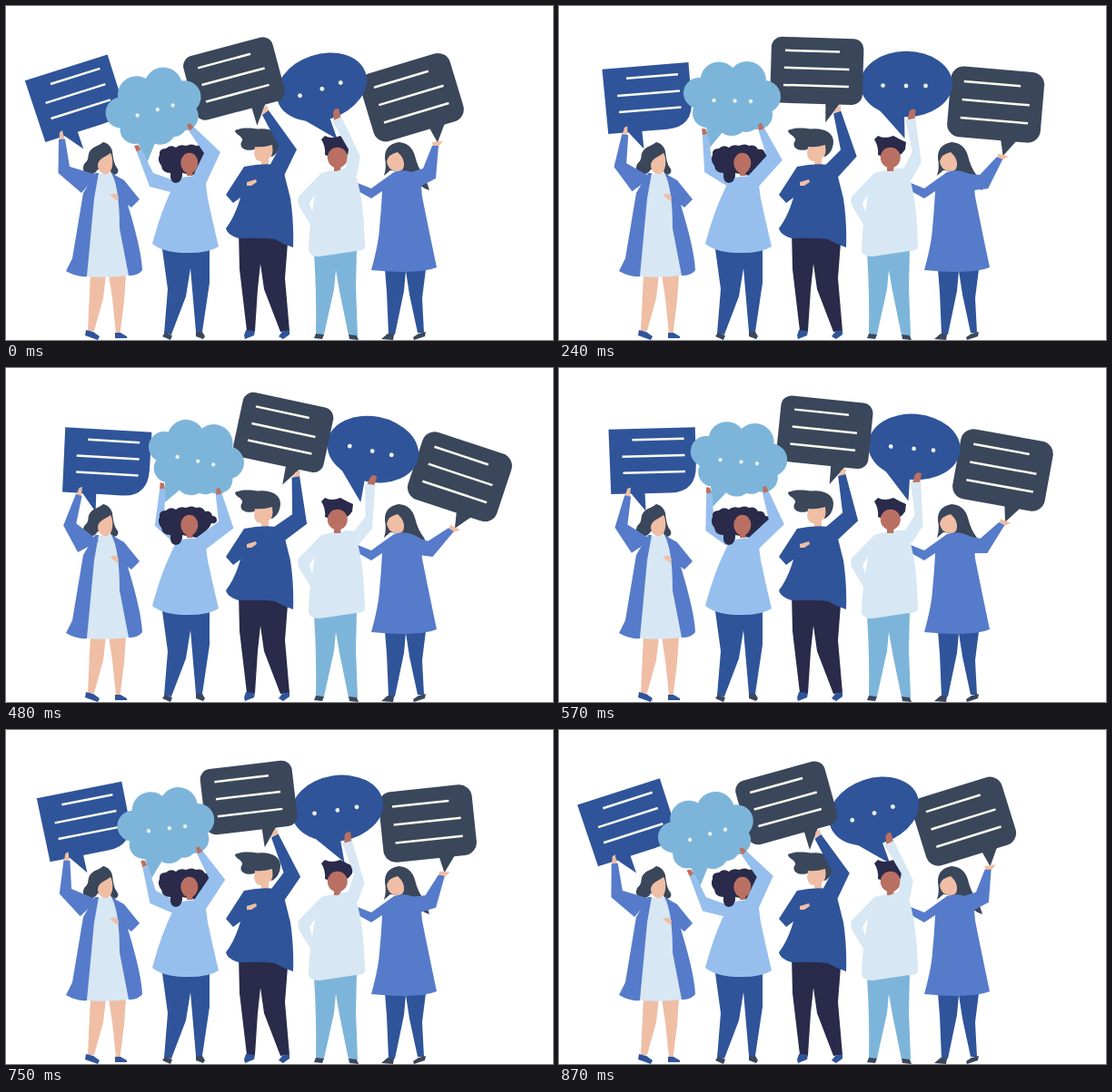
An HTML page that plays this animation: 602 px wide and 368 px high, repeating every 0.9 s.

```html
<!DOCTYPE html>
<html lang="en">
<head>
<meta charset="utf-8">
<title>People with speech bubbles</title>
<style>
html, body { margin: 0; width: 100%; height: 100%; overflow: hidden; background: #fff; }
svg { display: block; width: 602px; height: 368px; }
.blue { fill: #2f549a; }
.mid { fill: #567bca; }
.light { fill: #96bfee; }
.sky { fill: #7db5da; }
.slate { fill: #3a465a; }
.pale { fill: #d7e7f4; }
.navy { fill: #2a2a4b; }
.skin { fill: #efbea5; }
.brown { fill: #b97062; }
.dots { fill: #e9f1e8; }
.lines { fill: none; stroke: #fbfcec; stroke-width: 2.5; }
</style>
</head>
<body>
<svg viewBox="0 0 602 368">
  <!-- bubbles -->
  <g data-arm="e" data-rest="6.2">
    <rect class="slate" x="421.8" y="66.7" width="103" height="78" rx="14"/>
    <path class="slate" d="M482 143L486 161.5L500 143Z"/>
    <path class="lines" d="M436.4 83.2H499M436 103.3H510.4M435.8 123.4H510.4"/>
  </g>
  <g data-arm="d" data-rest="8">
    <ellipse class="blue" cx="382.2" cy="86" rx="50.8" ry="36.2"/>
    <path class="blue" d="M352 114L380.5 146L380 118Z"/>
    <g class="dots"><circle cx="356.5" cy="87.6" r="2.4"/><circle cx="382" cy="88" r="2.4"/><circle cx="403.5" cy="88" r="2.4"/></g>
  </g>
  <g data-arm="c" data-rest="7.2">
    <rect class="slate" x="229.7" y="35.4" width="101.6" height="72.8" rx="11.5"/>
    <path class="slate" d="M291 107L291.6 128.3L307 107Z"/>
    <path class="lines" d="M245 50.2H305M244.4 69.3H316M244 88.4H316"/>
  </g>
  <g data-arm="a" data-rest="10.9">
    <path class="blue" d="M57.700 66.800H153V108Q153 138.300 124 138.300H96L96.500 158L81 138.300H58.700Z"/>
    <path class="lines" d="M83.4 79H140.5M72 97.3H141M72.5 115.4H141"/>
  </g>
  <g data-arm="b" data-rest="8">
    <g class="sky">
      <circle cx="154" cy="96" r="17"/><circle cx="176" cy="82" r="20.5"/>
      <circle cx="207" cy="82" r="21"/><circle cx="226" cy="100" r="18"/>
      <circle cx="219" cy="120" r="16"/><circle cx="190" cy="125" r="18"/>
      <circle cx="163" cy="118" r="16"/><circle cx="206" cy="124" r="15"/>
      <ellipse cx="190" cy="103" rx="32" ry="27"/>
      <path d="M160 122L166 156L180 139L195 120Z"/>
    </g>
    <g class="dots"><circle cx="170.5" cy="104" r="2.2"/><circle cx="193.5" cy="104.5" r="2.2"/><circle cx="211" cy="105" r="2.2"/></g>
  </g>

  <!-- woman in blue dress -->
  <path class="blue" d="M417 290H462L458 322L460 360H453L444 318L440 292L438 314L428 362H421L419 315Z"/>
  <path class="slate" d="M420 361L427 362L426 368L413 367ZM454 361L462 359L461 364L449 368L448 365Z"/>
  <path class="slate" d="M417 168Q416 153 432 150Q446 151 450 165Q453 178 460 187Q463 193 466 203Q455 200 450 190L438 183L423 181L416 187Q419 178 417 168Z"/>
  <path class="skin" d="M419 171Q421 163 431 161Q439 168 438 176Q437 183 430 182Q420 181 419 171Z"/>
  <path class="mid" d="M427 183Q442 178 456 188L458 210Q466 250 474 288Q455 296 402 291Q410 262 411 245Q413 225 414 204L402 212L384 202L382 193L402 201Z"/>
  <g data-arm="e">
    <path class="skin" d="M470 155L469 150L481 148.5L476 155Z"/>
    <path class="mid" d="M469 154L476 154L473 190L448 203L436 186L459 179Z"/>
  </g>

  <!-- man in pale sweater -->
  <path class="sky" d="M339 272L386 268L385 310L387 363H377L367 314L363 291L361 312L350 362H341Q342 320 339 272Z"/>
  <path class="slate" d="M341 361L350 362L348 367L339 366ZM377 362L386 363L388 368L378 367Z"/>
  <path class="pale" fill-rule="evenodd" d="M347 184L322 210Q320 216 323 221L335 241Q333 258 333 270Q335 276 345 276L385 270Q394 270 395 266Q394 216 386 190L378 180Q360 180 347 184ZM340 208L334 217L337 227Z"/>
  <path class="navy" d="M347 147L351 143Q358 147 368 143Q375 147 382 150L381 158Q378 163 374 165L356 166L351 164Q352 155 347 147Z"/>
  <ellipse class="brown" cx="364.8" cy="167" rx="11" ry="11.3"/>
  <path class="brown" d="M361 175H369L368 182H361Z"/>
  <g data-arm="d">
    <path class="brown" d="M360 117L362 113.5L366 113L368.5 123L361 126Z"/>
    <path class="pale" d="M359 127L369 122L390 166L386 187L370 200L364 182L374 178L377 158Z"/>
  </g>

  <!-- man in blue sweater -->
  <path class="navy" d="M256 248H311L307 300L312 358L302 359L284 312L280 284L277 312L274 358H265L257 290Z"/>
  <path class="blue" d="M264 357L274 358L273 363L263 367L262 363ZM304 359L312 357V362L305 367L300 364Z"/>
  <path class="slate" d="M252 137C262 133 270 135 278 135.500C290 134 302 139 302 149C302 159 296 165 292 166L290 156L277 156C270 161 259 159 258.500 153C258 149 262 149 259 145C257 142 252 141 252 137Z"/>
  <path class="skin" d="M274 155Q283 156 293 153Q295 166 289 168V176H281V171Q275 172 273 163Z"/>
  <path class="blue" d="M262 177Q285 172 304 176L307 188L313 212Q317 238 316 266Q306 263 296 257Q285 255 256 256Q243 252 242 245Q252 232 258 211L250 217L242 208Z"/>
  <path class="skin" d="M265 194L275 191L276 194L270 198L265 198Z"/>
  <g data-arm="c">
    <path class="skin" d="M282 120L283 113L287 109L289 115Z"/>
    <path class="blue" d="M282 120L289 115L320 158L304 191L285 190L289 178L301 156Z"/>
  </g>

  <!-- woman in light blue shirt -->
  <g data-arm="b">
    <path class="brown" d="M141 154L145 153L149 158L144 161Z"/>
    <path class="light" d="M144 161L149 157.5L162 184L190 194L185 206L158 199Z"/>
  </g>
  <path class="blue" d="M172 268H224L224 305L216 359H209L203 289L198 320L182 362L174 361L178 312Z"/>
  <path class="slate" d="M175 360L183 363L181 368L172 364ZM209 359H216L219 364L217 367L209 364Z"/>
  <path class="navy" d="M198 154Q205 151 209 154Q216 152 219 158Q226 157 227 163Q232 163 232 168Q231 172 226 171Q224 178 210 187L194 184Q194 195 187 195Q180 194 181 184Q172 184 171 176Q166 170 169 164Q168 157 176 157Q181 152 187 156Q191 152 198 154Z"/>
  <path class="light" d="M187 192Q202 184 219 190L222 212Q228 240 234 265Q222 273 195 272Q172 271 161 262Q170 228 181 205Z"/>
  <path class="navy" d="M181 184L194 183Q194 195 187 195Q180 194 181 184Z"/>
  <ellipse class="brown" cx="201.8" cy="173" rx="9.5" ry="11.2"/>
  <path class="brown" d="M199 181H205.5V187H199Z"/>
  <g data-arm="b">
    <path class="brown" d="M199 131L202 129L207 134L202 138Z"/>
    <path class="light" d="M201.5 138L207 133.5L236 161L218 200H200L206 187L218 162Z"/>
  </g>

  <!-- woman in coat -->
  <path class="skin" d="M93 296H110L107 322L97 358H90L92 315ZM113 296H132L130 325L125.500 361H121L117 322Z"/>
  <path class="blue" d="M88 357L96 359L103 364L101 368L87 363ZM120 360H126L133 364V366H120Z"/>
  <path class="slate" d="M107 150C112 151 116 155 117 160C118 168 119 174 122 178C125 182 123 186 118 186C116 186 116 184 115 182L101 180C98 186 91 187 88 184C83 181 85 174 88 172C92 168 89 164 93 159C97 154 101 155 107 150Z"/>
  <path class="pale" d="M99 185L117 184L126 200L128 235L135 297Q110 300 89 298L96 205Z"/>
  <path class="skin" d="M101 175C102 168 108 167 115 162C119 168 118 184 111 185C105 186 101 181 101 175Z"/>
  <g data-arm="a">
    <path class="skin" d="M58.500 148L59 139L62 137L64.500 148Z"/>
    <path class="mid" d="M58 147L65 146.500L70 177L100 186L83 206L57.500 184Z"/>
  </g>
  <path class="mid" d="M98 184L85 206L73 278L66 292Q78 299 89 298L97 212L102 184ZM116 184L130 192L147 213L138 222L134 219Q149 268 150 291Q146 297 135 297L125 245Q125 200 116 184Z"/>
  <path class="skin" d="M114 208L120 206.500L124 210L123 215L119 212Z"/>
</svg>
<script>
// Shoulder pivot and degrees per step for each raised arm with its bubble
const ARMS = {
  a: [89, 194, 1.61],
  b: [212, 198, 2.14],
  c: [297, 188, 2.083],
  d: [375, 196, 2.28],
  e: [443, 193.5, 2.7]
};
const STEP = 30, STEPS = 30;
// step number -> swing position, linear in between
const SWING = [[0, 0], [14, 14], [15, 14], [25, 4], [29, -0.2]];
const parts = [...document.querySelectorAll('[data-arm]')];

function swingAt(n) {
  const i = SWING.findIndex(([at]) => at >= n);
  const [x1, y1] = SWING[i], [x0, y0] = SWING[Math.max(i - 1, 0)];
  return x1 === x0 ? y1 : y0 + (y1 - y0) * (n - x0) / (x1 - x0);
}

function draw(time) {
  const pos = swingAt(Math.floor(time / STEP) % STEPS);
  for (const el of parts) {
    const [x, y, rate] = ARMS[el.dataset.arm];
    const angle = (pos - (el.dataset.rest || 0)) * rate;
    el.setAttribute('transform', `rotate(${angle} ${x} ${y})`);
  }
}

const start = performance.now();
function tick() {
  draw(Math.max(0, performance.now() - start));
  requestAnimationFrame(tick);
}
tick();
</script>
</body>
</html>
```
